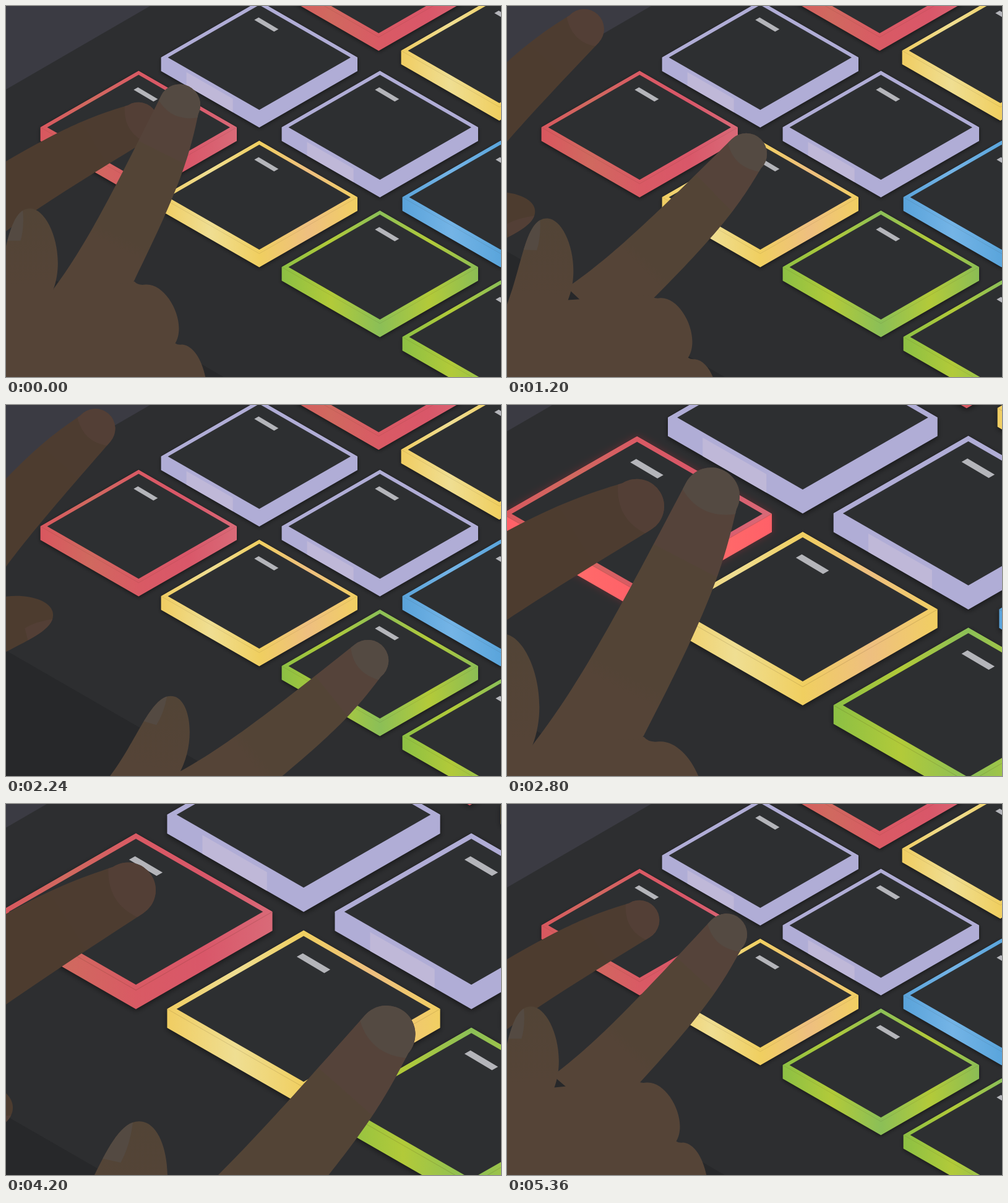
Animation, 800 px wide and 600 px high, one loop 5400 ms. Source, as an HTML page with a canvas:

```html
<!DOCTYPE html>
<html lang="en">
<head>
<meta charset="utf-8">
<title>Finger drumming</title>
<style>
html, body { margin: 0; width: 100%; height: 100%; overflow: hidden; background: #2d2e30; }
canvas { display: block; width: 100%; height: 100%; }
</style>
</head>
<body>
<canvas id="stage" width="800" height="600"></canvas>
<script>
const ctx = document.getElementById('stage').getContext('2d');
const LOOP = 5400, STEP = 40, BEAT = 675;
const HALF_W = 158.7, HALF_H = 91.2, DEPTH = 22, PRESS = 15, RIM = 11;

// Colours at even steps from the left corner to the right one
const RED = ['#d9575f', '#d0695f', '#d95a64', '#d95769', '#d96a78'];
const YELLOW = ['#f0cd62', '#efde92', '#f0cf60', '#eebf80', '#f1cf62'];
const GREEN = ['#8cc044', '#b2ca39', '#8bbf57', '#b3ca39', '#8bbd55'];
const BLUE = ['#5aa3da', '#74b4e6', '#5aa5dc', '#5aa5dc', '#5aa5dc'];
const PURPLE = ['#b0add6', '#b0add6'];

// Pads sit on an isometric grid of columns u and rows v
const pads = [
  { u: 0, v: -1, tint: RED },
  { u: 1, v: -1, tint: YELLOW },
  { u: 0, v: 0, tint: PURPLE },
  { u: 1, v: 0, tint: PURPLE },
  { u: 2, v: 0, tint: BLUE },
  { u: 0, v: 1, tint: RED, lit: ['#ff6068', '#ff6c6a'], glow: '255,50,60', hit: 2, every: 2 * BEAT },
  { u: 1, v: 1, tint: YELLOW, lit: ['#ffff6a', '#ffff98'], glow: '255,245,50', hit: BEAT + 2, every: 2 * BEAT },
  { u: 2, v: 1, tint: GREEN, lit: ['#76ff40', '#f4ff32'], glow: '130,255,40', hit: 330, every: BEAT },
  { u: 3, v: 1, tint: GREEN }
];

// Knuckle positions of the left hand
const OVER_RED = { x: -43.5, y: 344.5, angle: 85 };
const OVER_YELLOW = { x: 130, y: 462, angle: 85 };
const RAISED = { x: -102, y: 214, angle: 74 };

const RIGHT_SKIN = { palm: '#554437', thumb: '#524436', mid: '#534436', tip: '#55433a', nail: '#544a42' };
const LEFT_SKIN = { palm: '#4d3c2f', thumb: '#4d3c2f', mid: '#4d3c2f', tip: '#4d3c30', nail: '#533f36' };

const mod = (a, n) => ((a % n) + n) % n;
const mix = (a, b, p) => a + (b - a) * p;
const span = (t, a, b) => Math.min(1, Math.max(0, (t - a) / (b - a)));
const smooth = p => p * p * (3 - 2 * p);
const cubic = p => p < .5 ? 4 * p ** 3 : 1 - 4 * (1 - p) ** 3;
const turn = deg => ctx.rotate(deg * Math.PI / 180);

function fillPoly(points, color) {
  ctx.beginPath();
  for (const [x, y] of points) ctx.lineTo(x, y);
  ctx.closePath();
  ctx.fillStyle = color;
  ctx.fill();
}

function ramp(x0, y0, x1, y1, colors) {
  const g = ctx.createLinearGradient(x0, y0, x1, y1);
  colors.forEach((c, i) => g.addColorStop(i / (colors.length - 1), c));
  return g;
}

function shadow(color, blur, dy) {
  ctx.shadowColor = color;
  ctx.shadowBlur = blur;
  ctx.shadowOffsetY = dy;
}

function drawPad(pad, t, zoom) {
  const { u, v } = pad;
  const age = pad.every ? mod(t - pad.hit, pad.every) : Infinity;
  const down = age < 120 ? PRESS * (1 - age / 120) ** 2 : 0;
  const lit = age < 130;
  const gap = v < 0 ? 1 : 0; // the back row stands a little apart
  const x = 409.3 + 195 * (u - v) - 2 * gap;
  const y = -8 + 113 * (u + v) - 11 * gap + down;
  const cy = y + HALF_H, b = cy + HALF_H, l = x - HALF_W, r = x + HALF_W;
  const d = DEPTH - down, slope = HALF_H / HALF_W, rise = RIM * slope;
  const tint = ramp(l, 0, r, 0, pad.tint);

  if (lit) shadow(`rgba(${pad.glow},${Math.max(.2, 1 - age / 130)})`, 9 * zoom, 0);
  else shadow('rgba(0,0,0,.5)', 6 * zoom, 2 * zoom);
  let side = tint;
  if (lit) {
    const [edge, mid] = pad.lit;
    side = ramp(l, 0, r, 0, [edge, mid, edge, mid, edge]);
  }
  fillPoly([[x, y], [r, cy], [r, cy + d], [x, b + d], [l, cy + d], [l, cy]], side);
  shadow('transparent', 0, 0);

  if (pad.tint === PURPLE) {
    const ends = [41, 116].map(w => [l + w, cy + w * slope]);
    const below = ends.map(([px, py]) => [px, py + d]).reverse();
    fillPoly([...ends, ...below], '#bfb8d8');
  }
  fillPoly([[x, y], [r, cy], [x, b], [l, cy]], tint);
  if (pad.tint !== PURPLE) {
    ctx.beginPath();
    ctx.moveTo(l, cy);
    ctx.lineTo(x, b);
    ctx.lineTo(r, cy);
    ctx.strokeStyle = 'rgba(60,40,20,.14)';
    ctx.lineWidth = .8;
    ctx.stroke();
  }
  fillPoly([[x, y + rise], [r - RIM, cy], [x, b - rise], [l + RIM, cy]], '#2d2f31');
  fillPoly([[x - 8, y + 30.5], [x - 1, y + 26.5], [x + 31, y + 45.5], [x + 24, y + 49.5]], '#b4b5ba');
}

// Finger pointing up from the knuckle at the origin
function drawIndex(skin) {
  const len = 314, r = 33.5;
  ctx.beginPath();
  ctx.moveTo(-51, 44);
  ctx.bezierCurveTo(-36, -40, -34, -120, -r, -len);
  ctx.arc(0, -len, r, Math.PI, 0);
  ctx.bezierCurveTo(50, -250, 60, -200, 60, -27);
  ctx.lineTo(50, 40);
  const g = ctx.createLinearGradient(0, -len, 0, 0);
  g.addColorStop(.26, skin.tip);
  g.addColorStop(.26, skin.mid);
  g.addColorStop(.74, skin.mid);
  g.addColorStop(.8, skin.palm);
  ctx.fillStyle = g;
  ctx.fill();
  ctx.save();
  ctx.clip();
  ctx.beginPath();
  ctx.moveTo(-40, 4 - len);
  ctx.quadraticCurveTo(0, 34 - len, 40, 2 - len);
  ctx.lineTo(40, -len - 40);
  ctx.lineTo(-40, -len - 40);
  ctx.fillStyle = skin.nail;
  ctx.fill();
  ctx.restore();
}

function drawPalm(skin) {
  ctx.beginPath();
  ctx.moveTo(-168, 40);
  ctx.bezierCurveTo(-140, -30, -140, -115, -102, -114); // thumb
  ctx.bezierCurveTo(-72, -113, -44, -40, -65, 17);
  ctx.lineTo(66, 4);
  ctx.quadraticCurveTo(72, 11, 84, 9);
  ctx.bezierCurveTo(118, 6, 152, 70, 132, 104); // folded fingers
  ctx.quadraticCurveTo(136, 107, 143, 106);
  ctx.bezierCurveTo(168, 108, 184, 150, 184, 190);
  ctx.lineTo(190, 240);
  ctx.lineTo(-220, 240);
  ctx.fillStyle = ramp(0, -114, 0, 10, [skin.thumb, skin.palm]);
  ctx.fill();
  ctx.save();
  ctx.clip();
  ctx.beginPath();
  ctx.moveTo(-145, -62);
  ctx.lineTo(-118, -62);
  ctx.quadraticCurveTo(-111, -85, -115, -118);
  ctx.lineTo(-145, -118);
  ctx.fillStyle = skin.nail;
  ctx.fill();
  ctx.restore();
}

function drawHand(x, y, angle, finger, skin, mirror, size) {
  ctx.save();
  ctx.translate(x, y);
  turn(angle);
  ctx.scale(mirror * size, size);
  ctx.save();
  turn(26.3 + mirror * finger);
  drawIndex(skin);
  ctx.restore();
  drawPalm(skin);
  ctx.restore();
}

// Taps red and yellow in turn, rising between the taps
function drawLeft(t) {
  const v = mod(t, BEAT);
  const beat = Math.floor(t / BEAT) + (v > BEAT / 2 ? 1 : 0);
  const base = beat % 2 ? OVER_YELLOW : OVER_RED;
  const lift = smooth(span(v, 130, 250)) - smooth(span(v, 480, 600));
  const tap = span(v, 0, 4) - span(v, 20, 75);
  const at = key => mix(base[key], RAISED[key], lift);
  drawHand(at('x'), at('y'), at('angle'), 3 * tap - 11 * lift, LEFT_SKIN, -1, .96);
}

// Reaches out to the green pad on every off-beat
function drawRight(t) {
  const v = mod(t, BEAT);
  const reach = cubic(span(v, 63, 202)) - cubic(span(v, 400, 580));
  const finger = 17 * (smooth(span(v, 95, 325)) - smooth(span(v, 630, 675)));
  drawHand(141.5 + 198 * reach, 441.5 + 168 * reach, 16 * reach, finger, RIGHT_SKIN, 1, 1);
}

function draw(t) {
  const near = cubic(span(t, 2240, 2960)) - cubic(span(t, 4600, 5320));
  const zoom = 1 + .39 * near;
  ctx.setTransform(zoom, 0, 0, zoom, -87.9 * near, -98.4 * near);
  ctx.fillStyle = '#2d2e30';
  ctx.fillRect(0, 0, 800, 600);
  fillPoly([[-200, 250.8], [-200, -200], [578, -200]], '#3b3b43');
  fillPoly([[-200, 281.6], [600, 743.2], [-200, 743.2]], '#27282a');
  for (const pad of pads) drawPad(pad, t, zoom);
  drawLeft(t);
  drawRight(t);
}

const start = performance.now();
function tick() {
  const t = (performance.now() - start) % LOOP;
  draw(Math.floor(t / STEP) * STEP);
  requestAnimationFrame(tick);
}
tick();
</script>
</body>
</html>
```
